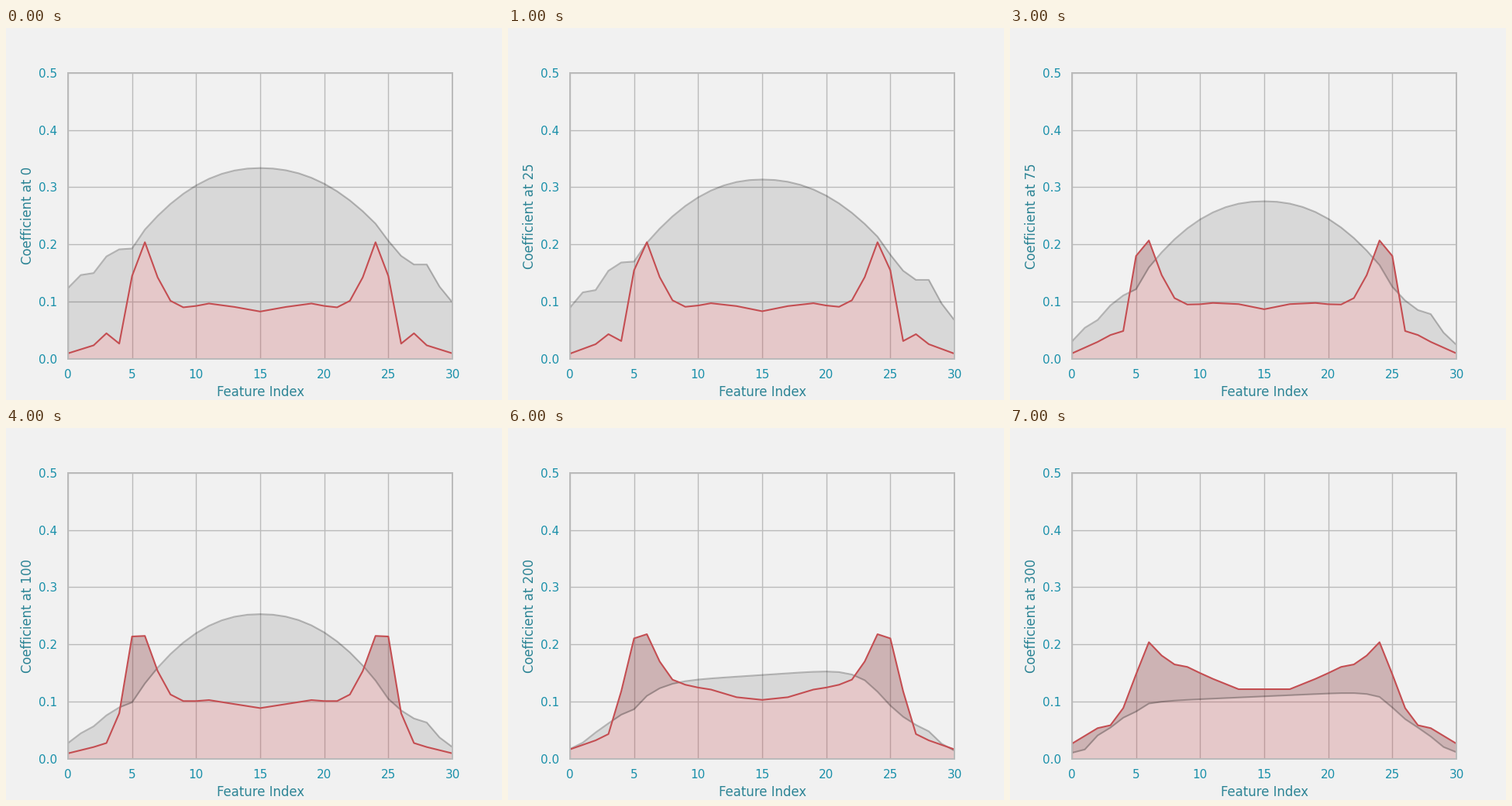
Recreate the animation shown at these times as a matplotlib script. Size 640x480 px, loop 8000 ms.

```python
import matplotlib.pyplot as plt
import numpy as np
from matplotlib.animation import FuncAnimation

BACK, LINE = "#f1f1f1", "#bababa"
TICK_TEXT, LABEL_TEXT = "#1a90aa", "#2c8495"
RED = "#c44e52"
STEPS = [0, 25, 50, 75, 100, 150, 200, 300]
X = np.arange(31)

# Key states; the steps between them are blended.
KEYS = [0, 50, 75, 100, 150, 300]

# Heights at 0, 2, 3, 4, 5, then the peak at 6 and the base at 9, 11, 13, 15.
RED_KEYS = [
    (.010, .024, .045, .027, .145, .204, .088, .097, .091, .083),
    (.009, .028, .042, .036, .165, .204, .090, .098, .094, .084),
    (.010, .030, .042, .049, .180, .207, .093, .098, .096, .087),
    (.010, .021, .028, .080, .214, .215, .099, .103, .096, .089),
    (.012, .022, .036, .133, .242, .225, .112, .112, .101, .094),
    (.027, .054, .059, .089, .148, .204, .160, .140, .122, .122),
]

# Heights at 0, 5, 6; dome centre, tilt, power; heights at 24, 25, 30.
GREY_KEYS = [
    (.124, .193, .226, .3335, 0, 2.15, .2365, .2065, .099),
    (.056, .1475, .180, .2935, 0, 2.15, .191, .158, .037),
    (.031, .122, .160, .2755, 0, 2.2, .164, .126, .025),
    (.028, .099, .132, .253, 0, 2.2, .137, .105, .021),
    (.021, .089, .117, .1655, .0017, 5, .122, .095, .016),
    (.011, .083, .097, .1095, .001, 8, .1085, .090, .012),
]

# Relative profiles of the dome's wings, from the tip inwards.
WING_KEYS = [50, 75, 300]
LEFT_WING = [(0, .33, .38, .80, .98, 1),
             (0, .26, .41, .69, .88, 1),
             (0, .08, .42, .61, .85, 1)]
RIGHT_WING = [(0, .255, .615, .615, .755, 1),
              (0, .21, .53, .60, .765, 1),
              (0, .115, .35, .55, .74, 1)]


def blend(step, keys, rows):
    return np.array([np.interp(step, keys, col) for col in zip(*rows)])


def red_curve(step):
    p = blend(step, KEYS, RED_KEYS)
    x = X[:16]
    foot = np.interp(x, [0, 2, 3, 4, 5], p[:5])
    base = np.interp(x, [9, 11, 13, 15], p[6:])
    fall = np.exp(-.755 * np.maximum(x - 6, 0) ** 1.5)
    half = np.where(x < 6, foot, base + (p[5] - p[6]) * fall)
    return np.concatenate([half, half[-2::-1]])


def grey_curve(step):
    tip0, root0, start, peak, tilt, power, end, root1, tip1 = blend(
        step, KEYS, GREY_KEYS)
    u = np.linspace(-1, 1, 19)
    drop = np.where(u < 0, peak - 9 * tilt - start, peak + 9 * tilt - end)
    dome = peak + 9 * tilt * u - drop * np.abs(u) ** power
    left = tip0 + (root0 - tip0) * blend(step, WING_KEYS, LEFT_WING)
    right = tip1 + (root1 - tip1) * blend(step, WING_KEYS, RIGHT_WING)
    return np.concatenate([left, dome, right[::-1]])


plt.rcParams["font.family"] = "DejaVu Sans"
fig, ax = plt.subplots(figsize=(6.4, 4.8), dpi=100, facecolor=BACK)
fig.subplots_adjust(left=.125, right=.9, bottom=.11, top=.88)


def draw(i):
    step = STEPS[i]
    low, high = red_curve(step), grey_curve(step)
    ax.clear()
    ax.set(xlim=(0, 30), ylim=(0, .5), facecolor=BACK, axisbelow=True)
    ax.set_xticks(range(0, 31, 5))
    ax.set_yticks(np.arange(6) / 10)
    ax.grid(color=LINE, linewidth=1)
    ax.tick_params(length=0, pad=9.5, labelsize=11, labelcolor=TICK_TEXT)
    ax.tick_params(axis="y", pad=10.2)
    for spine in ax.spines.values():
        spine.set(color=LINE, linewidth=1.4)
    label = dict(fontsize=11.9, color=LABEL_TEXT)
    ax.set_xlabel("Feature Index", **label)
    ax.set_ylabel(f"Coefficient at {step}", labelpad=3, **label)

    ax.fill_between(X, 0, low, color=RED, alpha=.25, linewidth=0)
    ax.fill_between(X, low, high, color="black", alpha=.1, linewidth=0)
    ax.plot(X, high, color="black", alpha=.25, linewidth=1.5)
    ax.plot(X, low, color=RED, linewidth=1.5)
    return []


anim = FuncAnimation(fig, draw, frames=len(STEPS), interval=1000,
                     init_func=lambda: draw(0), repeat=True, repeat_delay=0)
plt.show()
```
